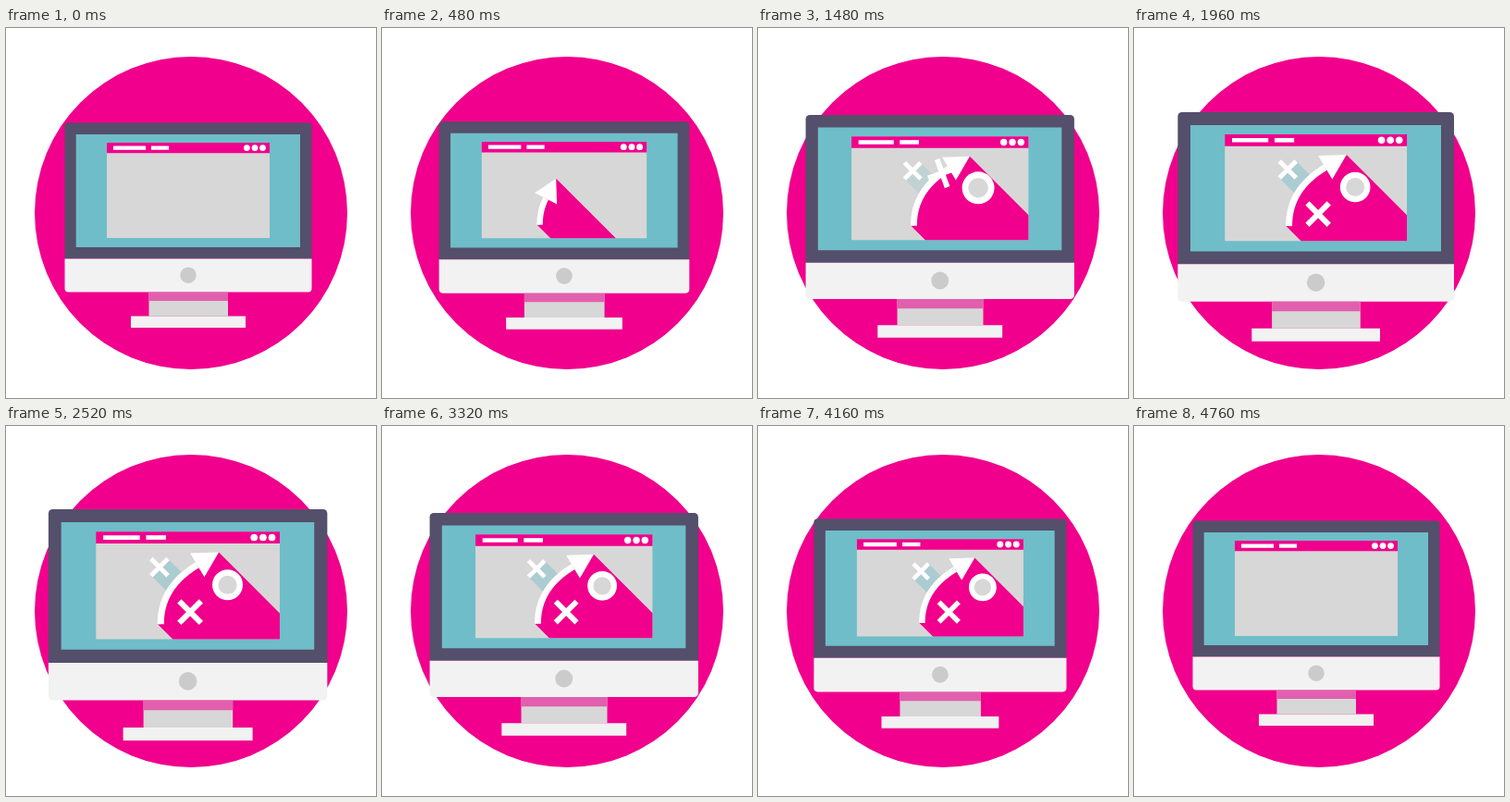
Animation, 400 px wide and 400 px high, one loop 4.8 s. Source, as an HTML page with a canvas:

```html
<!DOCTYPE html>
<html lang="en">
<head>
<meta charset="utf-8">
<title>Strategy screen</title>
<style>
  html, body { margin: 0; width: 100%; height: 100%; overflow: hidden; background: #fff; }
  canvas { display: block; width: 400px; height: 400px; }
</style>
</head>
<body>
<canvas id="stage" width="400" height="400"></canvas>
<script>
const ctx = document.getElementById('stage').getContext('2d');
const LOOP = 4800, STEP = 40;
const PINK = '#f0008c', TEAL = '#6fbdc8', SLATE = '#544f6b';
const LIGHT = '#f2f2f2', GREY = '#d7d7d7', WHITE = '#fff';

const clamp = v => Math.max(0, Math.min(1, v));
const progress = (t, from, to) => clamp((t - from) / (to - from));
const ease = p => p * p * (3 - 2 * p);
const eased = (t, from, to) => ease(progress(t, from, to));

function rect(x1, y1, x2, y2, color, radii = 0) {
  ctx.fillStyle = color;
  ctx.beginPath();
  ctx.roundRect(x1, y1, x2 - x1, y2 - y1, radii);
  ctx.fill();
}

function disc(x, y, r, color) {
  ctx.fillStyle = color;
  ctx.beginPath();
  ctx.arc(x, y, r, 0, Math.PI * 2);
  ctx.fill();
}

function polygon(points, color) {
  ctx.fillStyle = color;
  ctx.beginPath();
  points.forEach(([x, y]) => ctx.lineTo(x, y));
  ctx.closePath();
  ctx.fill();
}

function cross(x, y, length, width, scale = 1, angle = 0) {
  ctx.save();
  ctx.translate(x, y);
  ctx.rotate(Math.PI / 4 + angle);
  ctx.scale(scale, scale);
  ctx.fillStyle = WHITE;
  ctx.fillRect(-length / 2, -width / 2, length, width);
  ctx.fillRect(-width / 2, -length / 2, width, length);
  ctx.restore();
}

// Scale that grows past full size, then settles.
function pop(t, start, peak, end, overshoot) {
  return t < peak
    ? overshoot * eased(t, start, peak)
    : overshoot + (1 - overshoot) * eased(t, peak, end);
}

function drawMonitor() {
  rect(63.5, 102.5, 330.5, 249.5, SLATE, [4, 4, 0, 0]);
  rect(63.5, 249.5, 330.5, 285.5, LIGHT, [0, 0, 4, 4]);
  rect(75.7, 115, 318, 237, TEAL);
  disc(197, 267.2, 8.7, '#cbcbcb');
  rect(154.5, 285.5, 240, 311.5, GREY);
  rect(154.5, 285.5, 240, 295, '#e25fae');
  rect(135, 311.5, 259, 324, LIGHT);
}

function drawWindow() {
  rect(109, 124, 285, 227, GREY);
  rect(109, 124, 285, 135.3, PINK);
  rect(116, 127.5, 151, 131.7, WHITE);
  rect(157, 127.5, 176, 131.7, WHITE);
  for (const x of [260.4, 269, 277.5]) disc(x, 129.6, 3.4, WHITE);
}

const TAIL = [171, 212.6], BEND = [170.7, 177], NECK = [206, 156];

function shaftPoint(u) {
  const v = 1 - u;
  return [0, 1].map(i => v * v * TAIL[i] + 2 * u * v * BEND[i] + u * u * NECK[i]);
}

function drawArrow(grow) {
  if (grow <= 0) return;
  const shaft = Array.from({ length: 25 }, (_, i) => shaftPoint(grow * i / 24));
  const [x, y] = shaft[24];
  const slope = [0, 1].map(i =>
    (1 - grow) * (BEND[i] - TAIL[i]) + grow * (NECK[i] - BEND[i]));
  const size = Math.hypot(...slope);
  const dx = slope[0] / size, dy = slope[1] / size;
  const headLength = 24, headHalf = 13.3;
  const tip = [x + dx * headLength, y + dy * headLength];
  const far = ([px, py]) => [px + 160, py + 160];
  const heel = [TAIL[0] - 2.9, TAIL[1]];

  polygon([heel, ...shaft, tip, far(tip), far(heel)], PINK);

  ctx.strokeStyle = WHITE;
  ctx.lineWidth = 6.3;
  ctx.beginPath();
  shaft.forEach(p => ctx.lineTo(...p));
  ctx.stroke();
  polygon([
    tip,
    [x + dy * headHalf, y - dx * headHalf],
    [x - dy * headHalf, y + dx * headHalf]
  ], WHITE);
}

function drawPlan(t) {
  ctx.save();
  ctx.beginPath();
  ctx.rect(109, 135.3, 176, 91.7);
  ctx.clip();
  ctx.translate(125 * eased(t, 4080, 4640), 0);

  const shade = 0.42 * progress(t, 1160, 1800);
  if (shade > 0) {
    ctx.globalAlpha = shade;
    polygon([[161.8, 166.2], [178, 150], [218, 190], [201.8, 206.2]], TEAL);
    ctx.globalAlpha = 1;
  }

  drawArrow(eased(t, 280, 720));

  const lift = 4 * (1 - eased(t, 880, 1040));
  cross(169.8 - lift, 158 - lift, 22.8, 4.4, pop(t, 640, 880, 1040, 1.1));

  const ring = pop(t, 1200, 1440, 1600, 1.12);
  if (ring > 0) {
    disc(235, 175, 14.6 * ring, WHITE);
    disc(235, 175, 8.9 * ring, GREY);
  }

  const drop = eased(t, 1320, 1640);
  cross(199.2, 120 + 81 * drop, 29.5, 5.4, 1, (1 - drop) * Math.PI * 50 / 180);
  ctx.restore();
}

function render(t) {
  ctx.fillStyle = WHITE;
  ctx.fillRect(0, 0, 400, 400);
  disc(200, 200, 169, PINK);

  const zoom = 1 + 0.13 * ease(1 - Math.abs(t - LOOP / 2) / (LOOP / 2));
  ctx.save();
  ctx.translate(200, 200);
  ctx.scale(zoom, zoom);
  ctx.translate(-200, -200);
  drawMonitor();
  drawWindow();
  if (t < 4680) drawPlan(t);
  ctx.restore();
}

const begin = performance.now();
function tick() {
  const t = (performance.now() - begin) % LOOP;
  render(Math.floor(t / STEP) * STEP);
  requestAnimationFrame(tick);
}
tick();
</script>
</body>
</html>
```
